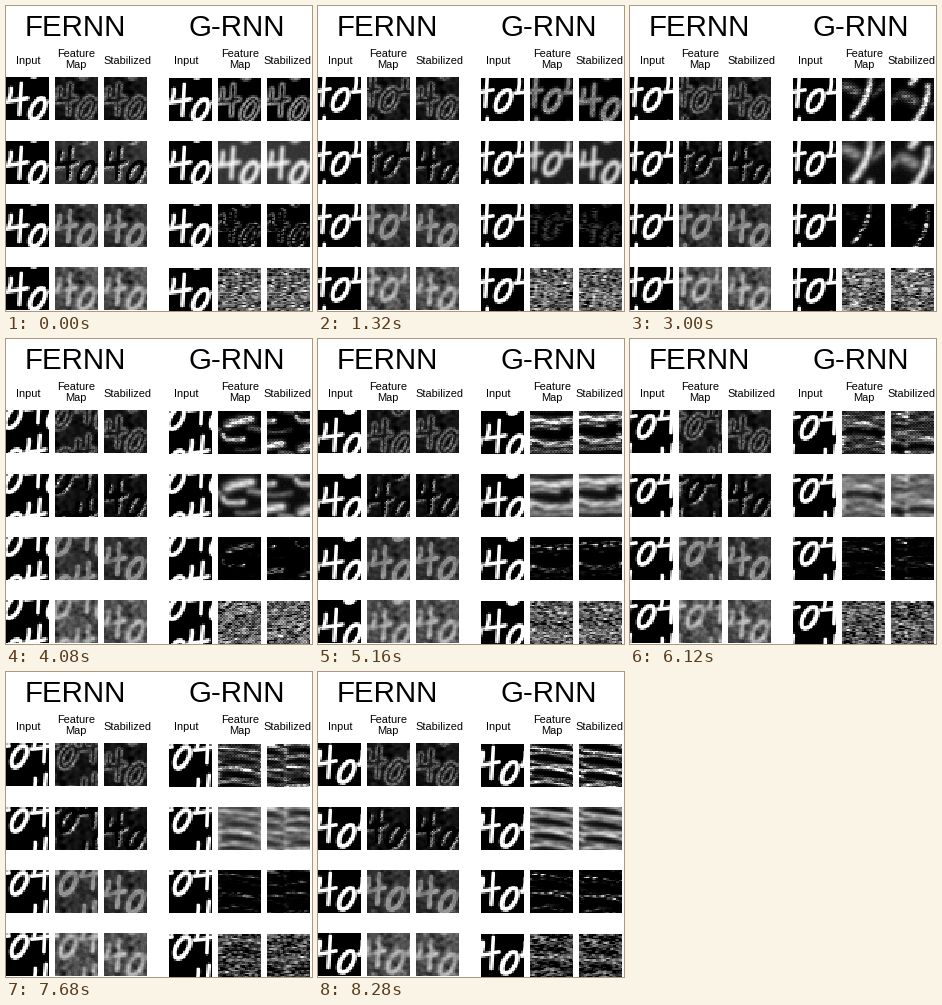
Recreate the animation shown at these times as a matplotlib script. Size 306 px wide and 305 px high, loop 8.4 s.

```python
import numpy as np
import matplotlib.pyplot as plt
from matplotlib.animation import FuncAnimation

W, H, DPI = 306, 305, 64
FRAMES, INTERVAL = 70, 120
N, CELL = 28, 43
SPEED = 2                       # grid cells per frame, along both axes
HELD = (5, 10, 20, 40)          # frames that repeat the previous picture
ROWS_LEFT, ROWS_RIGHT = (71, 135, 198, 261), (72, 135, 198, 262)
COLS_LEFT, COLS_RIGHT = (0, 49, 98), (163, 212, 261)

Y, X = np.mgrid[0:N, 0:N] + 0.5
CHECKER = np.indices((N, N)).sum(0) % 2
PICK = np.arange(CELL) * N // CELL


def distance(points):
    """Distance of every grid cell to a set of points on the torus."""
    px, py = np.asarray(points, float).T
    half = N / 2
    dx = (X[..., None] - px + half) % N - half
    dy = (Y[..., None] - py + half) % N - half
    return np.hypot(dx, dy).min(-1)


def bezier(a, b, c):
    t = np.linspace(0, 1, 60)[:, None]
    a, b, c = map(np.array, (a, b, c))
    return a * (1 - t) ** 2 + 2 * b * t * (1 - t) + c * t ** 2


def ellipse(cx, cy, major, minor, tilt):
    t = np.linspace(0, 2 * np.pi, 100)
    u, v = major * np.cos(t), minor * np.sin(t)
    return np.c_[cx + u * np.sin(tilt) + v * np.cos(tilt),
                 cy - u * np.cos(tilt) + v * np.sin(tilt)]


def blur(a, times=1, axes=(0, 1)):
    for _ in range(times):
        for axis in axes:
            a = (np.roll(a, 1, axis) + 2 * a + np.roll(a, -1, axis)) / 4
    return a


def gradient(a):
    return [(np.roll(a, -1, axis) - np.roll(a, 1, axis)) / 2 for axis in (1, 0)]


def shift(a, cells):
    return np.roll(a, (cells, cells), (0, 1))


def noise(seed, smooth=0, axes=(0, 1)):
    a = blur(np.random.default_rng(seed).normal(size=(N, N)), smooth, axes)
    return a / a.std()


def make_digits():
    four = np.vstack([bezier((2.8, 7), (3, 11), (1.4, 15)),
                      bezier((0.4, 15.6), (6, 15), (13.4, 13.4)),
                      bezier((9.8, 4), (9, 13), (8.4, 24))])
    zero = ellipse(20.3, 20.5, 7.6, 3.9, 0.52)
    thin = np.clip(1.8 - distance(four), 0, 1)
    thick = np.clip(2 - distance(zero), 0, 1)
    return np.maximum(thin, thick)


DIGITS = make_digits()
SOFT = blur(DIGITS)
GX, GY = gradient(SOFT)
EDGES = np.hypot(GX, GY)
EDGES /= EDGES.max()
RIM = np.clip(-(0.8 * GX + 0.6 * GY), 0, 1)


def equivariant_maps(frame):
    """The four feature maps that travel along with the digits."""
    grain = 0.8 * noise(1) + 0.6 * noise(100 + frame)
    cloud = 0.9 * noise(2, 2) + 0.4 * noise(200 + frame, 2)
    back = 0.06 + 0.14 * np.exp(-frame / 4)
    return (0.07 + 0.36 * EDGES ** 1.4 * (1 + 0.25 * grain) + 0.03 * cloud,
            back - 0.3 * DIGITS + 1.5 * RIM * (1 + 0.3 * grain) + 0.03 * cloud,
            0.18 + 0.1 * EDGES + 0.33 * DIGITS + 0.045 * cloud + 0.01 * grain,
            0.3 + 0.4 * SOFT + 0.065 * cloud + 0.015 * grain)


def strokes(*curves):
    """Soft curves, each given as three points, a width and a strength."""
    field = np.zeros((N, N))
    for a, b, c, width, gain in curves:
        soft = gain * np.exp(-(distance(bezier(a, b, c)) / width) ** 2)
        field = np.maximum(field, soft)
    return field


def bands(count, slope, bend, width):
    gap = N / count
    return strokes(*[((0, y), (14, y + bend * (-1) ** i), (28, y + slope), width,
                      0.75 + 0.25 * np.cos(2.3 * i))
                     for i, y in enumerate(np.arange(count) * gap + 1.5)])


SMEARS = {
    25: strokes(((18, -1), (18, 12), (7, 25), 2.4, 1),
                ((2, 5), (5, 6), (9, 9), 4, 0.55),
                ((20, 11), (24, 8), (28, 3), 2.5, 0.4)),
    34: strokes(((6, 9), (13, 5), (21, 5), 3.2, 0.9),
                ((20, 11), (24, 11), (28, 12), 2, 0.6),
                ((3, 15), (4, 20), (16, 18), 2, 0.9),
                ((12, 25), (20, 26), (27, 24), 1.6, 0.4)),
    43: strokes(((0, 5), (14, 8), (28, 5), 3, 0.85),
                ((0, 10), (10, 10), (18, 11), 2, 0.6),
                ((0, 18), (14, 23), (28, 20), 2.4, 0.85),
                ((0, 25), (14, 26), (28, 25), 3, 0.5)),
    58: strokes(((0, 2), (14, 1), (28, 3), 2.4, 0.8),
                ((0, 9), (12, 6), (28, 12), 1.8, 0.9),
                ((0, 17), (12, 14), (28, 21), 2.2, 0.9),
                ((0, 24), (12, 22), (28, 26), 1.8, 0.6)),
    69: bands(6, 4, 2.5, 1.4),
}
KEYS = (0, 11, *SMEARS)


def memory(frame):
    """Hidden state that starts as the digits and smears into bands."""
    weights = [np.interp(frame, KEYS, np.eye(len(KEYS))[i]) for i in range(len(KEYS))]
    uneven = 1 + 0.22 * noise(5, 4, (1,)) * np.clip(frame / 40, 0, 1)
    field = (weights[0] + weights[1]) * shift(0.9 * SOFT, SPEED * frame)
    for weight, smear in zip(weights[2:], SMEARS.values()):
        field = field + weight * smear * uneven
    return np.clip(field, 0, 1)


def plain_maps(frame):
    field = memory(frame)
    grain = noise(300 + frame)
    streak = noise(400 + frame, 1, (1,))
    mesh = np.exp(-((frame - 34) / 9) ** 2)
    early = np.clip(1 - frame / 18, 0, 1)
    late = np.clip((frame - 40) / 29, 0, 1)
    outline = shift(EDGES, SPEED * frame)
    sharp = (1 - early) * field ** 1.5 + early * 0.75 * outline * field ** 0.4
    ridge = (1 - early) * 0.8 * field ** 4 + early * 0.6 * outline ** 2
    checks = 1 - CHECKER * (1 - early) * np.clip(0.6 - 0.6 * field, 0, 1)
    return (sharp * (checks + 0.12 * grain),
            0.05 + 0.16 * early + 0.9 * blur(field) + 0.01 * grain,
            ridge * np.clip(0.5 + 0.45 * streak, 0, 1.2),
            0.4 - 0.2 * late + 0.18 * streak + mesh * 0.16 * (CHECKER - 0.5)
            + (0.15 + 0.25 * late) * (field - field.mean()))


def paste(stage, cell, left, top):
    stage[top:top + CELL, left:left + CELL] = np.clip(cell, 0, 1)[np.ix_(PICK, PICK)]


def render(frame):
    if frame in HELD:
        frame -= 1
    stage = np.ones((H, W))
    moved = SPEED * frame
    picture = shift(DIGITS, moved)
    for stable, top in zip(equivariant_maps(frame), ROWS_LEFT):
        for cell, left in zip((picture, shift(stable, moved), stable), COLS_LEFT):
            paste(stage, cell, left, top)
    for feature, top in zip(plain_maps(frame), ROWS_RIGHT):
        for cell, left in zip((picture, feature, shift(feature, -moved)), COLS_RIGHT):
            paste(stage, cell, left, top)
    return stage


fig = plt.figure(figsize=(W / DPI, H / DPI), dpi=DPI, facecolor="white")
ax = fig.add_axes([0, 0, 1, 1])
ax.axis("off")
image = ax.imshow(render(0), cmap="gray", vmin=0, vmax=1, extent=(0, W, H, 0),
                  interpolation="nearest", aspect="auto")
ax.set(xlim=(0, W), ylim=(H, 0))


def label(x, baseline, text, pixels):
    ax.text(x, baseline, text, ha="center", va="baseline", color="black",
            family="Liberation Sans", fontsize=pixels * 72 / DPI)


for title, middle, columns in (("FERNN", 69, (22, 70, 121)),
                               ("G-RNN", 231, (180, 234, 281))):
    label(middle, 30.5, title, 29.5)
    label(columns[0], 58.5, "Input", 11)
    label(columns[1], 51, "Feature", 11)
    label(columns[1], 62.5, "Map", 11)
    label(columns[2], 58.5, "Stabilized", 11)


def update(frame):
    image.set_data(render(frame))
    return [image]


animation = FuncAnimation(fig, update, frames=FRAMES, interval=INTERVAL, repeat=True)
plt.show()
```
